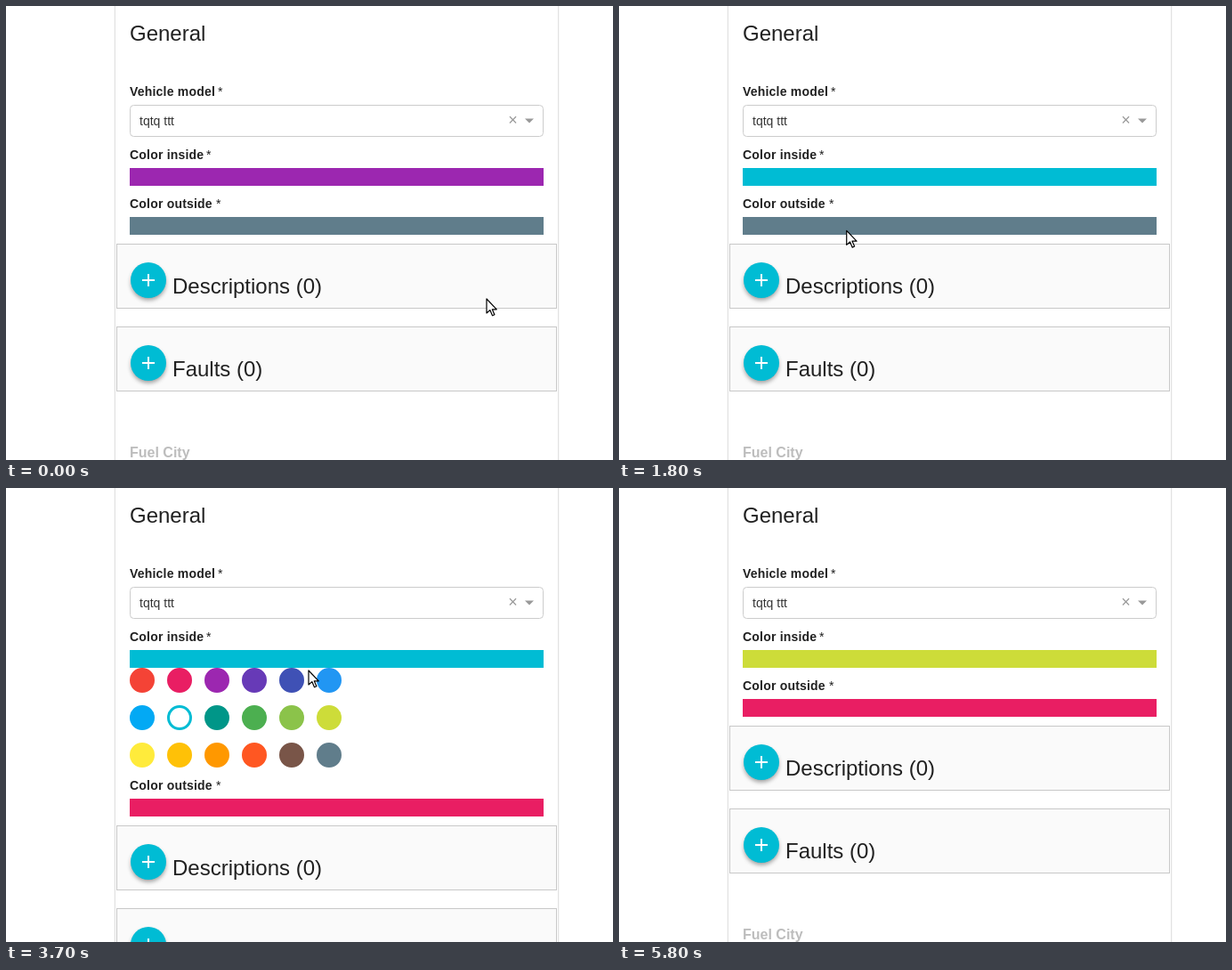
Recreate the animation shown at these times as an HTML page. Size 682 by 510 pixels, loop 6.1 s.

```html
<!DOCTYPE html>
<html lang="en">
<head>
<meta charset="utf-8">
<title>Color fields</title>
<style>
  html, body { margin: 0; width: 100%; height: 100%; overflow: hidden; background: #fff; }
  svg { display: block; width: 100%; height: 100%; }
  text { font-family: "Liberation Sans", Arial, sans-serif; fill: #212121; white-space: pre; }
  .title { font-size: 24px; }
  .label { font-size: 14px; font-weight: bold; letter-spacing: .2px; }
  .plain { font-size: 14px; }
</style>
</head>
<body>
<svg id="stage" viewBox="0 0 682 510">
  <defs>
    <filter id="soft" x="-50%" y="-50%" width="200%" height="200%">
      <feGaussianBlur stdDeviation="2.6"/>
    </filter>
    <g id="add">
      <circle cx="160" cy="311" r="19.5" fill="#000" opacity=".38" filter="url(#soft)"/>
      <circle cx="160" cy="308" r="20" fill="#00bcd4"/>
      <path d="M153 307h6v-6h2v6h6v2h-6v6h-2v-6h-6z" fill="#fff"/>
    </g>
  </defs>
  <rect width="682" height="510" fill="#fff"/>
  <path d="M121.5 0V510M621.5 0V510" stroke="#f7f7f7"/>
  <path d="M122.5 0V510M620.5 0V510" stroke="#e2e2e2"/>

  <text class="title" x="139" y="39">General</text>
  <text class="label" x="139" y="101">Vehicle model</text>
  <text class="plain" x="238" y="101">*</text>
  <rect x="139.5" y="111.5" width="464" height="35" rx="4" fill="#fff" stroke="#ccc"/>
  <text class="plain" x="150" y="134" style="fill:#333">tqtq ttt</text>
  <text x="564.3" y="134" style="font-size:18px;fill:#999">×</text>
  <path d="M583 126.5h10l-5 5z" fill="#999"/>

  <text class="label" x="139" y="172">Color inside</text>
  <text class="plain" x="225" y="172">*</text>
  <rect id="inside" x="139" y="182" width="465" height="20"/>

  <g id="outsideField">
    <text class="label" x="139" y="227">Color outside</text>
    <text class="plain" x="236" y="227">*</text>
    <rect id="outside" x="139" y="237" width="465" height="20"/>
  </g>

  <g id="below">
    <g fill="#fafafa" stroke="#c8c8c8">
      <rect x="124.5" y="267.5" width="494" height="72"/>
      <rect x="124.5" y="360.5" width="494" height="72"/>
    </g>
    <use href="#add"/>
    <use href="#add" y="93"/>
    <text class="title" x="187" y="323">Descriptions (0)</text>
    <text class="title" x="187" y="416">Faults (0)</text>
    <text x="139" y="507" style="font-size:16px;font-weight:bold;fill:#bdbdbd">Fuel City</text>
  </g>

  <g id="picker"></g>

  <g id="cursor" stroke="#000" stroke-width="1.2" stroke-linejoin="round" fill="#fff">
    <path id="arrow" d="M0 0v16l3.8-3.4 2.7 6.2 2.4-1.1-2.6-5.9h5z"/>
    <g id="hand">
      <path d="M-2 2a2 2 0 0 1 4 0v6q3-1 3.6 1 3-.8 3.6 1.2 2.7-.4 2.7 2v5q0 2-1.9 4v3h-10v-3L-5.3 15q-1-3 .5-3.5 1.4 0 2.8 3z"/>
      <path d="M2 8v4.5M5.6 9v4M9.2 10.2v3.5" fill="none" stroke-width="1"/>
    </g>
  </g>
</svg>
<script>
const LOOP = 6100, STEP = 100, PICKER_HEIGHT = 112;
const COLORS = ("f44336 e91e63 9c27b0 673ab7 3f51b5 2196f3 03a9f4 00bcd4 009688 " +
  "4caf50 8bc34a cddc39 ffeb3b ffc107 ff9800 ff5722 795548 607d8b").split(" ").map(c => "#" + c);

// Times the picker is open, and the swatch picked in each.
const SESSIONS = [
  { field: "inside",  open: 600,  click: 1345, close: 1500, from: 2,  to: 7 },
  { field: "outside", open: 2100, click: 2863, close: 3000, from: 17, to: 1 },
  { field: "inside",  open: 3600, click: 4433, close: 4600, from: 7,  to: 11 }
];

// Pointer stops: time, x, y
const STOPS = [
  [0, 540, 329], [500, 352, 194], [600, 350, 195], [1200, 200, 253], [1500, 200, 253],
  [2000, 286, 252], [2200, 286, 254], [2700, 195, 265], [3000, 195, 265],
  [3400, 337, 196], [3600, 338, 197], [3700, 340, 205], [4200, 367, 260],
  [4700, 367, 260], [5200, 335, 530]
];

const $ = id => document.getElementById(id);
const lerp = (a, b, k) => a + (b - a) * k;
const clamp = k => Math.min(1, Math.max(0, k));
const smooth = k => k * k * (3 - 2 * k);

// CSS "ease": cubic-bezier(.25, .1, .25, 1)
function ease(x) {
  const bez = (a, b, u) => 3 * a * u * (1 - u) ** 2 + 3 * b * u * u * (1 - u) + u ** 3;
  let lo = 0, hi = 1;
  for (let i = 0; i < 20; i++) {
    const mid = (lo + hi) / 2;
    if (bez(.25, .25, mid) < x) lo = mid; else hi = mid;
  }
  return bez(.1, 1, hi);
}

const swatches = COLORS.map((color, i) => {
  const el = document.createElementNS("http://www.w3.org/2000/svg", "circle");
  el.setAttribute("fill", "none");
  el.setAttribute("stroke", color);
  $("picker").append(el);
  return { el, x: 153 + 42 * (i % 6), row: 14 + 42 * Math.floor(i / 6) };
});

function pointer(t) {
  const i = STOPS.findIndex(s => s[0] > t);
  if (i < 0) return STOPS[STOPS.length - 1].slice(1);
  const [t0, x0, y0] = STOPS[i - 1], [t1, x1, y1] = STOPS[i];
  const k = smooth((t - t0) / (t1 - t0));
  return [lerp(x0, x1, k), lerp(y0, y1, k)];
}

function drawPicker(session, t, px, py) {
  const top = session.field === "inside" ? 202 : 257;
  const k = ease(clamp((t - session.click) / 100));
  let over = false;
  swatches.forEach(({ el, x, row }, i) => {
    const y = top + row;
    const hover = Math.abs(px - x) <= 14 && Math.abs(py - y) <= 14;
    const active = i === session.to ? k : i === session.from ? 1 - k : 0;
    const ring = lerp(14, 3, active), scale = hover ? 1.2 : 1;
    el.setAttribute("cx", x);
    el.setAttribute("cy", y);
    el.setAttribute("r", (14 - ring / 2) * scale);
    el.setAttribute("stroke-width", ring * scale);
    over = over || hover;
  });
  return over;
}

const show = (el, on) => el.setAttribute("visibility", on ? "visible" : "hidden");
const shift = (el, x, y) => el.setAttribute("transform", `translate(${x} ${y})`);

function render(t) {
  const fill = { inside: 2, outside: 17 };
  SESSIONS.forEach(s => { if (t >= s.close) fill[s.field] = s.to; });
  for (const field in fill) $(field).setAttribute("fill", COLORS[fill[field]]);

  const session = SESSIONS.find(s => t >= s.open && t < s.close);
  const [px, py] = pointer(t);
  const over = session ? drawPicker(session, t, px, py) : false;
  show($("picker"), session);
  shift($("outsideField"), 0, session && session.field === "inside" ? PICKER_HEIGHT : 0);
  shift($("below"), 0, session ? PICKER_HEIGHT : 0);

  shift($("cursor"), px, py);
  show($("arrow"), !over);
  show($("hand"), over);
}

const start = performance.now();
function tick() {
  const t = (performance.now() - start) % LOOP;
  render(Math.floor(t / STEP) * STEP);
  requestAnimationFrame(tick);
}
tick();
</script>
</body>
</html>
```
